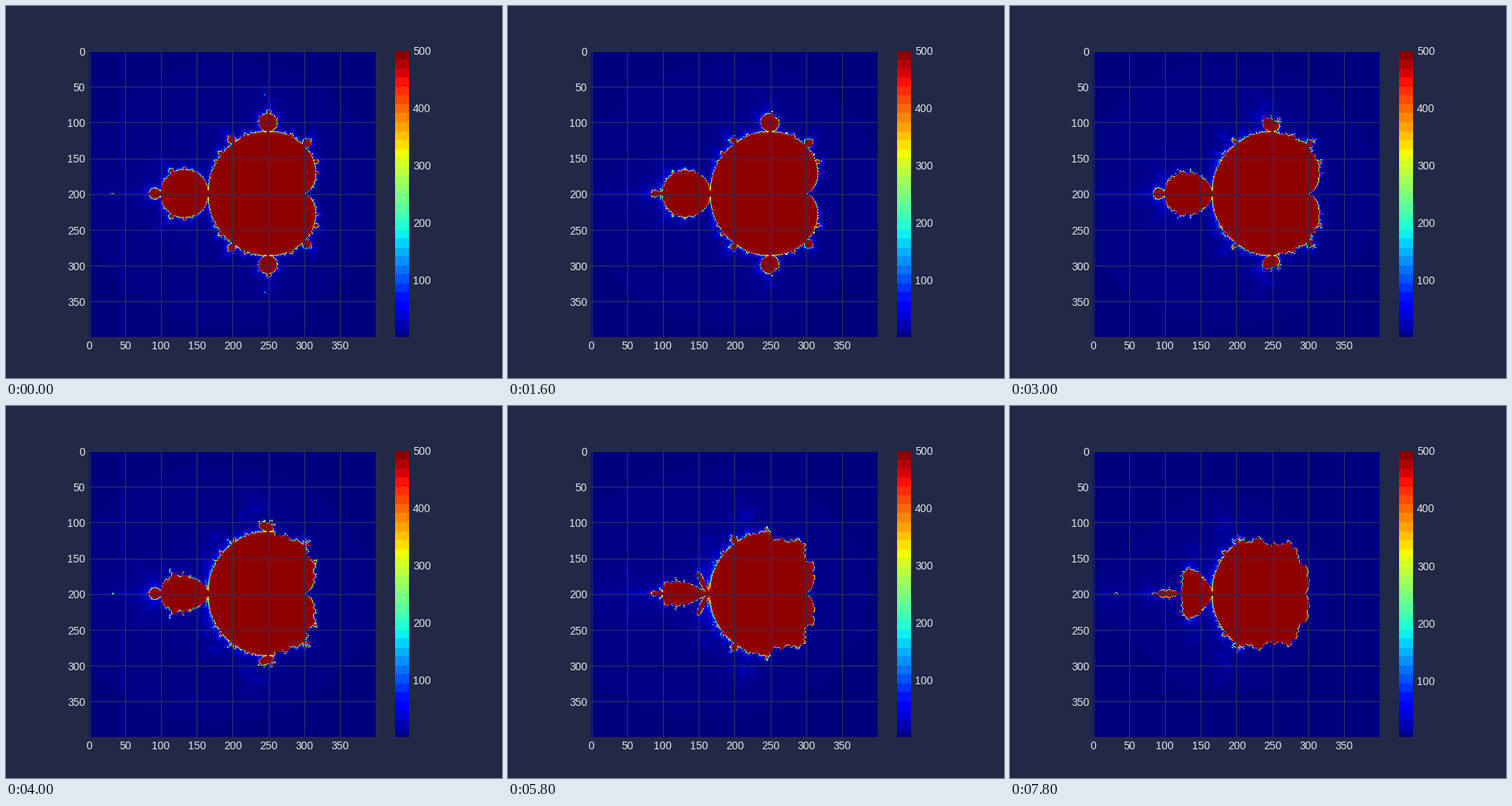
Recreate the animation shown at these times as a matplotlib script. Size 640 by 480 pixels, loop 8000 ms.

```python
import numpy as np
import matplotlib.pyplot as plt
from matplotlib.animation import FuncAnimation
from matplotlib.colors import ListedColormap

FRAMES, INTERVAL = 40, 200
SIZE, MAX_ITER, RADIUS = 400, 500, 2.2
BACK, GRID, TEXT = "#212946", "#2A3459", "0.9"

plt.rcParams.update({
    "font.family": "Liberation Sans", "font.size": 10,
    "figure.facecolor": BACK, "axes.facecolor": BACK,
    "axes.edgecolor": GRID, "axes.linewidth": 0,
    "grid.color": GRID, "grid.linewidth": 0.8,
    "xtick.color": TEXT, "ytick.color": TEXT,
    "xtick.major.size": 0, "ytick.major.size": 0,
})


def banded_jet(band=8, smooth=8):
    """Jet in flat bands, keeping the darkest blues apart."""
    i = np.arange(256)
    mid = i // band * band + band // 2
    return ListedColormap(plt.get_cmap("jet")(np.where(i < smooth, i, mid)))


# Rows mirror about the real axis, so only the upper half is iterated.
xs = np.linspace(-2, 1, SIZE)
ys = np.linspace(-1.5, 1.5, SIZE)[:SIZE // 2]
PLANE = (xs + 1j * ys[:, None]).ravel()


def escape_counts(start):
    """Escape time of z -> z*z + c when every orbit begins at start."""
    counts = np.full(PLANE.size, MAX_ITER)
    index = np.arange(PLANE.size)
    c = PLANE
    z = np.full(PLANE.size, complex(start))
    for n in range(1, MAX_ITER):
        z = z * z + c
        out = z.real ** 2 + z.imag ** 2 > RADIUS ** 2
        if out.any():
            counts[index[out]] = n
            keep = ~out
            index, c, z = index[keep], c[keep], z[keep]
        if n % 60 == 0:
            # Orbits that have settled on a short cycle never escape.
            w = z
            for _ in range(12):
                w = w * w + c
            keep = abs(w - z) > 1e-9
            index, c, z = index[keep], c[keep], z[keep]
    half = counts.reshape(SIZE // 2, SIZE)
    return np.vstack([half, half[::-1]])


def start_value(frame):
    return 0.015 * (frame + 5)


fig, ax = plt.subplots(figsize=(6.4, 4.8), dpi=100)
image = ax.imshow(escape_counts(start_value(0)), cmap=banded_jet())
ax.grid(True)
bar = fig.colorbar(image, ax=ax)


def update(frame):
    counts = escape_counts(start_value(frame))
    image.set_data(counts)
    image.set_clim(counts.min(), MAX_ITER)
    return [image]


anim = FuncAnimation(fig, update, frames=FRAMES, interval=INTERVAL,
                     repeat=True, repeat_delay=0, blit=False)
plt.show()
```
